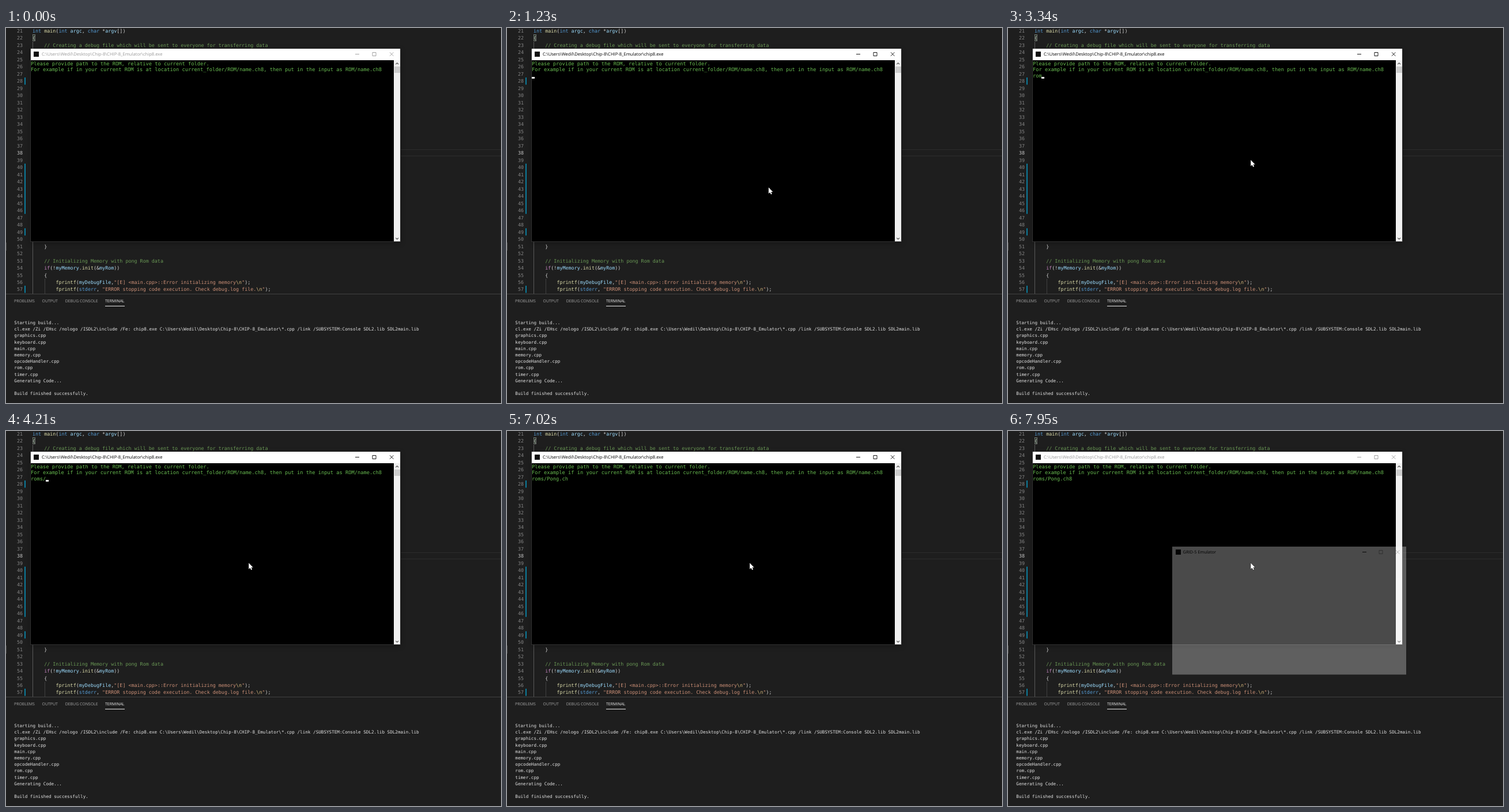
An HTML page for the animation above (8000 ms loop, 859x652 px).

```html
<!DOCTYPE html>
<html lang="en">
<head>
<meta charset="utf-8">
<title>Console prompt</title>
<style>
  html, body { margin: 0; width: 100%; height: 100%; overflow: hidden; background: #1e1e1e; }
  svg { display: block; }
  text { white-space: pre; text-rendering: geometricPrecision; fill: #d4d4d4; }
  .code { font: 8.39px "DejaVu Sans Mono", monospace; }
  .term { font: 7.64px "DejaVu Sans Mono", monospace; fill: #e2e2e2; }
  .cons { font: 8.72px "DejaVu Sans Mono", monospace; fill: #68bb50; }
  .title { font: 7.63px "Open Sans", "Noto Sans", sans-serif; fill: currentColor; }
  .tab { font: 6.95px "Open Sans", "Noto Sans", sans-serif; fill: #a5a5a5; }
  .num { fill: #858585; text-anchor: end; }
  .buttons { fill: none; stroke: currentColor; stroke-width: .9; }
  .shadow { filter: drop-shadow(0 2px 4px rgba(0, 0, 0, .3)); }
</style>
</head>
<body>
<svg width="859" height="652" viewBox="0 0 859 652">
  <rect width="859" height="652" fill="#1e1e1e"/>
  <path d="M684 211.5H859M684 222.5H859" stroke="#2d2d2d"/>
  <path d="M.5 373V387" stroke="#484848"/>
  <path d="M46.5 24V462" stroke="#5a5a5a"/>
  <path d="M67.5 436V462" stroke="#404040"/>
  <rect x="46.5" y="11.5" width="4" height="11" fill="#1b2a1b" stroke="#888" stroke-width=".8"/>
  <g id="editor"></g>

  <rect y="462" width="859" height="190" fill="#1e1e1e"/>
  <path d="M0 462.5H859" stroke="#414141"/>
  <text class="tab" x="14" y="477">PROBLEMS</text>
  <text class="tab" x="62.5" y="477">OUTPUT</text>
  <text class="tab" x="102.7" y="477">DEBUG CONSOLE</text>
  <text class="tab" x="172" y="477" style="fill:#f0f0f0">TERMINAL</text>
  <path d="M172 483.5H206" stroke="#e7e7e7"/>
  <g id="terminal"></g>

  <g id="console">
    <rect class="shadow" x="42" y="36" width="643" height="336" fill="#333"/>
    <rect x="43" y="36" width="641" height="20" fill="#fff"/>
    <rect x="43" y="56" width="630" height="315" fill="#000"/>
    <rect x="48" y="41" width="9" height="9" fill="#111"/>
    <text class="title" x="62" y="48.4">C:\Users\Wedil\Desktop\Chip-8\CHIP-8_Emulator\chip8.exe</text>
    <path class="buttons" d="M606 45.5h7M636 42.5h6v6h-6zM666 42.3l6.4 6.4M672.4 42.3l-6.4 6.4"/>
    <rect x="673" y="56" width="11" height="315" fill="#f0f0f0"/>
    <rect x="674" y="67" width="10" height="11" fill="#cdcdcd"/>
    <path d="M676.3 63.2l2.4-2.4 2.4 2.4M676.3 364.8l2.4 2.4 2.4-2.4" fill="none" stroke="#505050" stroke-width="1.2"/>
    <text class="cons" x="43" y="64.7">Please provide path to the ROM, relative to current folder.</text>
    <text class="cons" x="43" y="75.2">For example if in your current ROM is at location current_folder/ROM/name.ch8, then put in the input as ROM/name.ch8</text>
    <text class="cons" x="43" y="85.7" id="typed"></text>
    <rect id="caret" y="85" width="5" height="3" fill="#fff"/>
  </g>

  <g id="popup" opacity=".29" color="#000">
    <rect x="285" y="201" width="406" height="222.5" fill="#fff"/>
    <rect x="291" y="206" width="9" height="9" fill="#111"/>
    <text class="title" x="303.5" y="213.4" style="font-size:7.4px">GRID-5 Emulator</text>
    <path class="buttons" d="M615 210.5h7M673 207.3l6.4 6.4M679.4 207.3l-6.4 6.4"/>
    <path class="buttons" color="#999" d="M644 207.5h6v6h-6z"/>
  </g>
  <path id="pointer" d="M0 0V10.6L2.4 8.5 4 12 5.8 11.2 4.2 7.8H7.4Z" fill="#fff" stroke="#111" paint-order="stroke"/>
</svg>
<script>
const $ = id => document.getElementById(id);

function add(parent, tag, attrs, text = '') {
  const node = document.createElementNS('http://www.w3.org/2000/svg', tag);
  for (const key in attrs) node.setAttribute(key, attrs[key]);
  node.textContent = text;
  return parent.appendChild(node);
}

// Editor
const LINE = 12.486, ADVANCE = 5.052;
const lineY = n => 8 + (n - 21) * LINE;
const colors = { k: '#569cd6', f: '#dcdcaa', v: '#9cdcfe', c: '#6a9955', s: '#ce9178', e: '#d7ba7d', i: '#c586c0', p: '#d4d4d4' };

// Each token is a colour key followed by its text.
function code(line, column, ...tokens) {
  const row = add($('editor'), 'text', { class: 'code', x: 46 + column * ADVANCE, y: lineY(line) });
  for (const token of tokens) add(row, 'tspan', { fill: colors[token[0]] }, token.slice(1));
}

for (let n = 21; n <= 57; n++) {
  add($('editor'), 'text', { class: 'code num', x: 29, y: lineY(n), style: n === 38 ? 'fill:#c6c6c6' : '' }, n);
}
for (const [first, last] of [[28, 28], [40, 46], [49, 49], [57, 57]]) {
  add($('editor'), 'rect', { x: 32, y: lineY(first) - 9.4, width: 2, height: (last - first + 1) * LINE, fill: '#0c7d9d' });
}
code(21, 0, 'kint', 'f main', 'p(', 'kint', 'v argc', 'p, ', 'kchar', 'p *', 'vargv', 'p[])');
code(22, 0, 'p{');
code(23, 4, 'c// Creating a debug file which will be sent to everyone for transferring data');
code(50, 18, 'p();');
code(51, 4, 'p}');
code(53, 4, 'c// Initializing Memory with pong Rom data');
code(54, 4, 'iif', 'p(!', 'vmyMemory', 'p.', 'finit', 'p(&', 'vmyRom', 'p))');
code(55, 4, 'p{');
code(56, 8, 'ffprintf', 'p(', 'vmyDebugFile', 'p,', 's"[E] <main.cpp>::Error initializing memory', 'e\\n', 's"', 'p);');
code(57, 8, 'ffprintf', 'p(', 'kstderr', 'p, ', 's"ERROR stopping code execution. Check debug.log file.', 'e\\n', 's"', 'p);');

// Terminal
String.raw`Starting build...
cl.exe /Zi /EHsc /nologo /ISDL2\include /Fe: chip8.exe C:\Users\Wedil\Desktop\Chip-8\CHIP-8_Emulator\*.cpp /link /SUBSYSTEM:Console SDL2.lib SDL2main.lib
graphics.cpp
keyboard.cpp
main.cpp
memory.cpp
opcodeHandler.cpp
rom.cpp
timer.cpp
Generating Code...

Build finished successfully.`.split('\n').forEach((text, i) =>
  add($('terminal'), 'text', { class: 'term', x: 14.3, y: 515 + i * 11.2 }, text));

// Animation
const LOOP = 8000, TICK = 70;
const INPUT = 'roms/Pong.ch8';
const keyTimes = [3040, 3100, 3340, 3560, 4210, 4610, 5090, 5320, 5400, 6470, 6700, 6930, 7550];
const caretToggles = [1230, 1790, 2250, 2780, 3040, 3880, 4210, 4360, 4610, 4920, 5090, 5960, 6470, 7020];
const passed = (times, t) => times.filter(time => time <= t).length;
const show = (id, on) => $(id).setAttribute('visibility', on ? 'visible' : 'hidden');

// The pointer is sampled once per tick while it moves.
function progress(t, start, ticks) {
  const step = Math.floor((t - start) / TICK);
  return Math.min(Math.max(step / ticks, 0), 1);
}

function pointerAt(t) {
  const enter = (1 - progress(t, 70, 8)) ** 2;
  const nudge = progress(t, 1410, 3);
  return [454 + 295 * enter - 32.7 * nudge, 277.2 + 315 * enter - 47.7 * nudge];
}

function draw() {
  const t = performance.now() % LOOP;
  const count = passed(keyTimes, t);
  $('typed').textContent = INPUT.slice(0, count);
  $('caret').setAttribute('x', Math.floor(43 + 5.25 * count));
  show('caret', passed(caretToggles, t) % 2);
  $('console').setAttribute('color', t >= 700 && t < 7880 ? '#000' : '#999');
  show('pointer', t >= 70);
  $('pointer').setAttribute('transform', `translate(${pointerAt(t)})`);
  show('popup', t >= 7950);
  requestAnimationFrame(draw);
}
draw();
</script>
</body>
</html>
```
